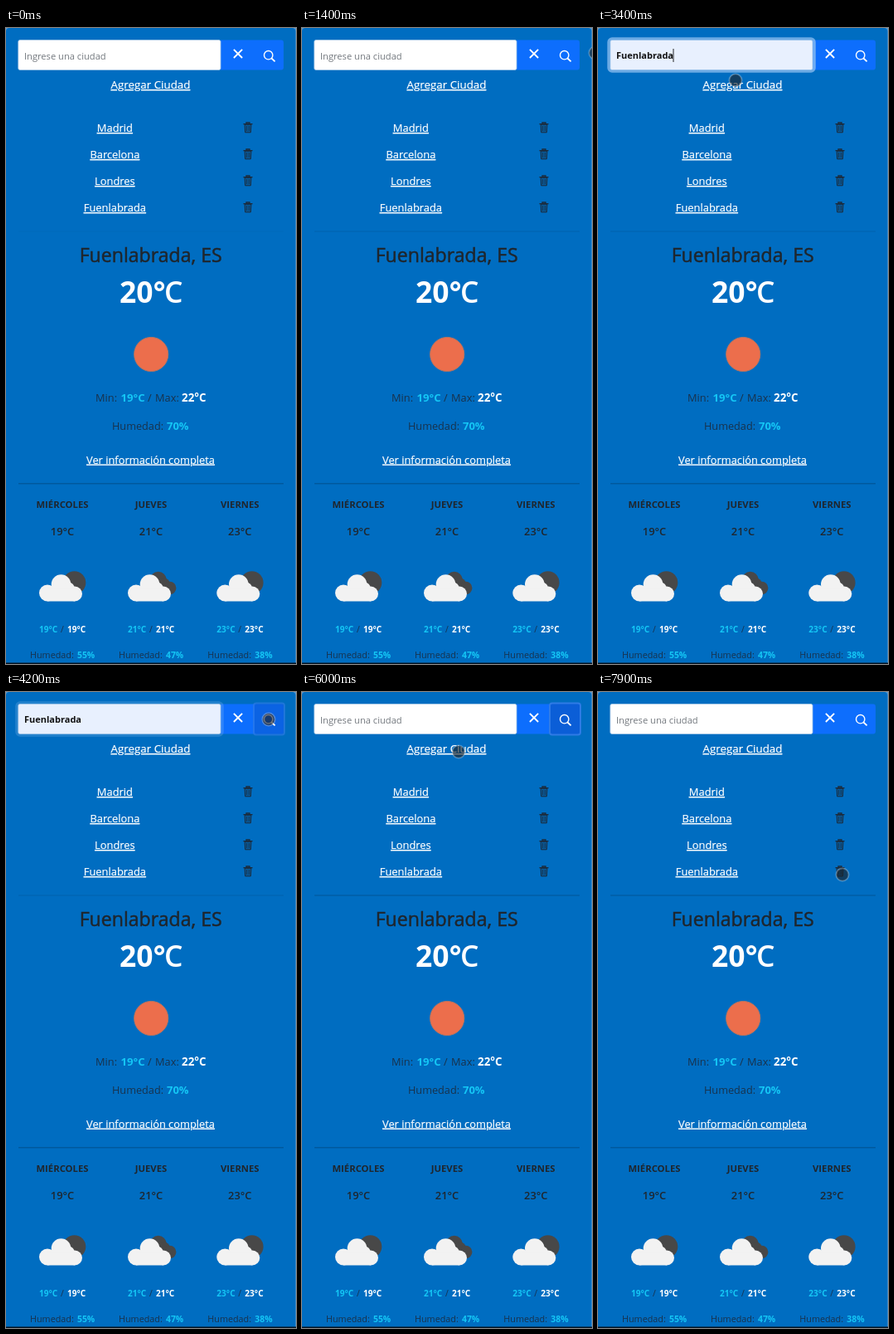
An HTML page for the animation above (8000 ms loop, 350 px wide and 766 px high).

```html
<!DOCTYPE html>
<html lang="es">
<head>
<meta charset="utf-8">
<title>Clima</title>
<style>
html, body { margin: 0; width: 100%; height: 100%; overflow: hidden; background: #006dc1; }
svg { display: block; width: 350px; height: 766px; font-family: "Open Sans", "Noto Sans", sans-serif; }
.link { text-decoration: underline; fill: #fff; stroke: #fff; stroke-width: .2px; }
.medium { stroke: #1f262d; stroke-width: .5px; }
</style>
</head>
<body>
<svg id="stage" viewBox="0 0 350 766" xmlns="http://www.w3.org/2000/svg">
  <defs>
    <g id="trash" fill="none" stroke="#1c2a3a">
      <path d="M-3.9-3.8L-3.3 5.8H3.3L3.9-3.8Z" fill="#1c2a3a" fill-opacity=".3"/>
      <path d="M-5.5-4.4H5.5M-2-4.8V-6H2V-4.8" stroke-width="1.3"/>
      <path d="M-1.4-2V4M1.4-2V4" stroke-width=".8"/>
    </g>
    <g id="cloud">
      <circle cx="-18" cy="9" r="10"/><circle cx="-1.5" cy="-1.5" r="11.8"/>
      <circle cx="7" cy="4" r="8"/><circle cx="15" cy="10" r="9"/>
      <rect x="-18" y="3" width="33" height="16"/>
    </g>
  </defs>
  <rect width="350" height="766" fill="#5d9bd0"/>
  <rect width="349.4" height="772" rx="4" fill="#006dc1"/>
  <rect y="764.5" width="350" height="2" fill="#06131f"/>
  <path d="M259 14.5H332a3 3 0 0 1 3 3V47.5a3 3 0 0 1-3 3H259Z" fill="#0d6efd"/>
  <rect id="field" x="14.8" y="14.5" width="244.2" height="36" rx="2" stroke="#a9c8e6" stroke-width=".8"/>
  <rect id="ring" x="13" y="13" width="248" height="39" rx="4" fill="none" stroke="#8fbff0" stroke-opacity=".75" stroke-width="3.5"/>
  <rect id="press" x="299" y="13.5" width="37" height="38" rx="3" fill="#0b5ed7" stroke="#2f7be6" stroke-width="2"/>
  <g fill="none" stroke="#fff">
    <path d="M274.9 25.8L285.1 36M285.1 25.8L274.9 36" stroke-width="1.9"/>
    <circle cx="316.7" cy="32.7" r="5.2" stroke-width="1.4"/>
    <path d="M320.5 36.5L324.6 40.4" stroke-width="1.8"/>
  </g>
  <path id="rule" d="M15 245H335" stroke="#000"/>
  <path d="M15 548.8H335" stroke="#000" stroke-opacity=".28"/>
  <circle cx="175.2" cy="393" r="20.6" fill="#ec6e4c" stroke="#b07565"/>
  <g id="content"></g>
  <rect id="caret" y="25" width="1" height="16" fill="#222"/>
  <circle id="pointer" r="7.6" fill="#1e1e1e" fill-opacity=".6" stroke="#fff" stroke-opacity=".28" stroke-width="1.8"/>
</svg>
<script>
const $ = id => document.getElementById(id);
const content = $('content');
const DARK = '#1f262d', DIM = '#18324c', CYAN = '#14c6f5', WHITE = '#fff', SHADE = '#484848';

function add(tag, attrs, text = '') {
  const el = document.createElementNS('http://www.w3.org/2000/svg', tag);
  for (const key in attrs) el.setAttribute(key, attrs[key]);
  el.textContent = text;
  content.append(el);
  return el;
}
const label = (text, x, y, size, fill, weight = 400, anchor = 'start') =>
  add('text', { x, y, fill, 'font-size': size, 'font-weight': weight, 'text-anchor': anchor }, text);
const middle = (text, x, y, size, fill, weight) => label(text, x, y, size, fill, weight, 'middle');
const link = (text, x, y, size) => middle(text, x, y, size, WHITE).classList.add('link');
const use = (id, x, y, fill = 'none', scale = 1) =>
  add('use', { href: '#' + id, fill, transform: `translate(${x} ${y}) scale(${scale})` });

link('Agregar Ciudad', 174.5, 73, 13.35);
['Madrid', 'Barcelona', 'Londres', 'Fuenlabrada'].forEach((city, i) => {
  link(city, 131.4, 125 + 32 * i, 12.9);
  use('trash', 292, 120 + 32 * i);
});

middle('Fuenlabrada, ES', 174.7, 282, 23.1, DARK).classList.add('medium');
label('20°', 137, 330.5, 35.5, WHITE, 700);
label('C', 213.5, 330.5, 35.5, WHITE, 600, 'end');
label('Min:', 108, 450, 12.8, DIM);
label('19°C', 138.5, 450, 13.2, CYAN, 700);
label('/', 171, 450, 12.8, DIM);
label('Max:', 180, 450, 12.8, DIM);
label('22°C', 212, 450, 13.4, WHITE, 700);
label('Humedad:', 128, 484, 12.7, DIM);
label('70%', 194, 484, 13, CYAN, 700);
link('Ver información completa', 174.5, 524.5, 12.85);

const days = [
  ['MIÉRCOLES', 68, 19, 55],
  ['JUEVES', 175, 21, 47],
  ['VIERNES', 282.3, 23, 38],
];
days.forEach(([day, x, temp, humidity], i) => {
  const deg = temp + '°C';
  middle(day, x, 577.5, 11.3, DARK, 700);
  middle(deg, x, 610.5, 12.9, DARK, 600);
  if (i === 1) use('cloud', x + 10, 666, SHADE, 0.85);
  else add('circle', { cx: x + 14.5, cy: 668, r: 13.8, fill: SHADE });
  use('cloud', x, 671.5, '#f2f2f2');
  label(deg, x - 28, 727.5, 10.1, CYAN, 700);
  label('/', x - 2, 727.5, 10.3, DIM);
  label(deg, x + 6, 727.5, 10.1, WHITE, 700);
  label('Humedad:', x - 39, 758.5, 10.8, DIM);
  label(humidity + '%', x + 18, 758.5, 10.4, CYAN, 700);
});

const hint = label('Ingrese una ciudad', 22, 37.5, 11.15, '#74797f');
const typed = label('Fuenlabrada', 22, 37, 11, '#111', 700);

// time, x, y
const path = [
  [1000, 372, 30], [1300, 372, 30], [1400, 354, 30], [1800, 280, 30], [2400, 108, 41],
  [2700, 108, 41], [3100, 150, 81], [3300, 150, 81], [3400, 166, 63],
  [3800, 317, 33], [4900, 317, 33], [5000, 260, 55], [5400, 189, 72],
  [6800, 189, 72], [7200, 276, 190], [7300, 276, 190], [7900, 295, 220],
];

function pointAt(t) {
  const next = path.findIndex(p => p[0] > t);
  if (next === 0) return path[0].slice(1);
  if (next < 0) return path[path.length - 1].slice(1);
  const [t0, x0, y0] = path[next - 1], [t1, x1, y1] = path[next];
  const k = (t - t0) / (t1 - t0);
  return [x0 + (x1 - x0) * k, y0 + (y1 - y0) * k];
}

const ramp = (t, from, to) => Math.min(1, Math.max(0, (t - from) / (to - from)));
const show = (el, on) => el.setAttribute('opacity', +on);

function draw(now) {
  const t = Math.floor((now % 8000) / 100) * 100;
  const filled = t >= 2900 && t < 6000;
  const [x, y] = pointAt(t);
  $('pointer').setAttribute('transform', `translate(${x} ${y})`);
  $('field').setAttribute('fill', filled ? '#e8f0fe' : '#fff');
  show(hint, !filled);
  show(typed, filled);
  show($('ring'), ramp(t, 2380, 2600) * (1 - ramp(t, 4000, 4300)));
  show($('press'), ramp(t, 4000, 4300) * (1 - ramp(t, 6000, 6300)));
  show($('caret'), t >= 2400 && t < 4100);
  $('caret').setAttribute('x', filled ? 90.5 : 21.5);
  $('rule').setAttribute('stroke-opacity', t < 1000 ? 0.03 : t < 6000 ? 0.1 : 0.22);
}

const start = performance.now();
function tick() {
  draw(performance.now() - start);
  requestAnimationFrame(tick);
}
tick();
</script>
</body>
</html>
```
